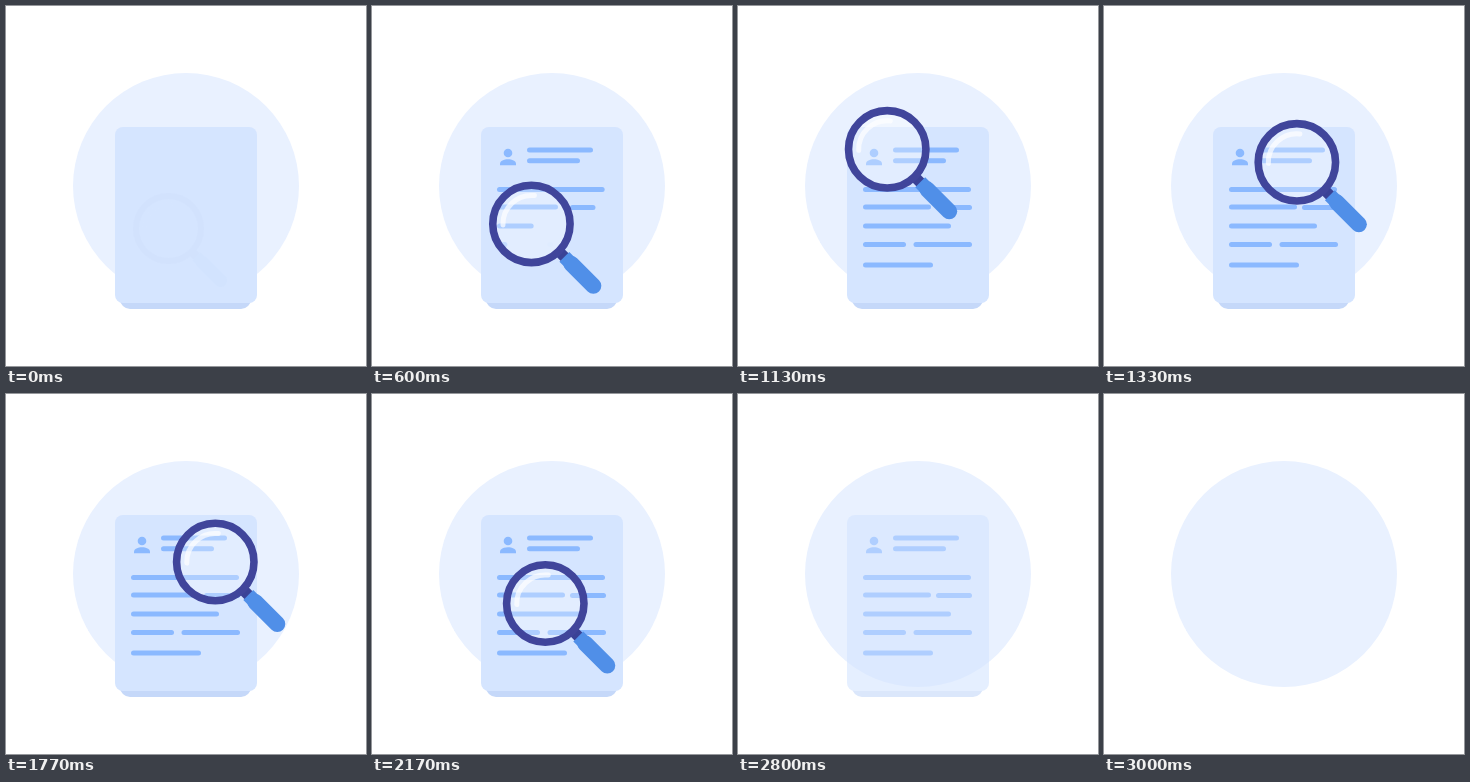
Animation, 360 px wide and 360 px high, one loop 3.03 s. Source, as an HTML page:

```html
<!DOCTYPE html>
<html lang="en">
<head>
<meta charset="utf-8">
<title>Document search</title>
<style>
  html, body { margin: 0; width: 100%; height: 100%; overflow: hidden; background: #fff; }
  svg { display: block; width: 100vw; height: 100vh; }
</style>
</head>
<body>
<svg viewBox="0 0 360 360">
  <clipPath id="page"><path d="M109 121H251V292L242 303H118L109 292Z"/></clipPath>
  <circle cx="180" cy="180" r="113" fill="#e9f1ff"/>
  <g id="doc">
    <rect x="114" y="270" width="131" height="33" rx="10" fill="#c5d8f9"/>
    <rect x="109" y="121" width="142" height="176" rx="8" fill="#d5e5ff"/>
    <g id="person" fill="#8bb9ff">
      <circle cx="136" cy="147" r="4.3"/>
      <path d="M128 159.2v-1.2c0-6.2 16-6.2 16 0v1.2z"/>
    </g>
    <g id="lines" fill="none" stroke="#8bb9ff" stroke-width="5" stroke-linecap="round">
      <path d="M157.5 144h61"/>
      <path d="M157.5 154.7h48"/>
      <path d="M127.5 183.5h103"/>
      <path d="M127.5 201h63"/>
      <path d="M200.5 201.6h31"/>
      <path d="M127.5 220h83"/>
      <path d="M127.5 238.5h38"/>
      <path d="M178 238.5h53.5"/>
      <path d="M127.5 259h65"/>
    </g>
  </g>
  <g id="clip">
    <g id="glass" fill="none">
      <path d="M27 27L36 36" stroke="#3a4296" stroke-width="11"/>
      <path d="M33 33L50 50" stroke="#508fe8" stroke-width="14"/>
      <path d="M40 40L62 62" stroke="#508fe8" stroke-width="16" stroke-linecap="round"/>
      <circle r="36" fill="#fff" fill-opacity=".3"/>
      <path d="M-28.5 1A28.5 28.5 0 0 1 3 -28.4" stroke="#fff" stroke-opacity=".7" stroke-width="5" stroke-linecap="round"/>
      <circle r="38.7" stroke="#40459b" stroke-width="7.6"/>
    </g>
  </g>
</svg>
<script>
const LOOP = 3030;
const $ = id => document.getElementById(id);
const ramp = (t, from, to) => Math.min(1, Math.max(0, (t - from) / (to - from)));
const ease = u => (1 - Math.cos(Math.PI * u)) / 2;
const bend = (u, a, b, c) => (1 - u) ** 2 * a + 2 * u * (1 - u) * b + u * u * c;

// Each leg of the search bends from the last stop past `via` to its own stop
const home = [162.5, 222.5];
const legs = [
  { from: 540, to: 930, via: [136, 184], stop: [126, 145.7] },
  { from: 930, to: 1500, via: [168, 135.5], stop: [209.7, 167.5] },
  { from: 1730, to: 2400, via: [187, 195], stop: [159, 225] },
  { from: 2400, to: 2600, via: [183.5, 242.5], stop: [208, 260] }
];

function lensAt(t) {
  let at = home;
  for (const { from, to, via, stop } of legs) {
    if (t < from) break;
    const u = ease(ramp(t, from, to));
    at = at.map((start, axis) => bend(u, start, via[axis], stop[axis]));
  }
  return at;
}

const lines = [...$('lines').children];
lines.forEach(line => line.setAttribute('pathLength', 1));

function draw(t) {
  lines.forEach((line, i) => {
    const grown = ease(ramp(t, 270 + 45 * i, 520 + 45 * i));
    line.setAttribute('stroke-dasharray', `${grown} 2`);
    line.setAttribute('opacity', Math.min(1, grown * 4));
  });
  $('person').setAttribute('opacity', ramp(t, 270, 500));
  $('doc').setAttribute('opacity', 1 - ramp(t, 2680, 2990));

  const size = 0.84 + 0.16 * ease(ramp(t, 270, 620));
  const shown = 0.01 + 0.99 * ramp(t, 270, 540);
  $('glass').setAttribute('transform', `translate(${lensAt(t)}) scale(${size})`);
  $('glass').setAttribute('opacity', shown * (1 - ramp(t, 2400, 2580)));
  $('clip').setAttribute('clip-path', t > 2490 ? 'url(#page)' : 'none');
}

const start = performance.now();
function tick() {
  draw((performance.now() - start) % LOOP);
  requestAnimationFrame(tick);
}
tick();
</script>
</body>
</html>
```
